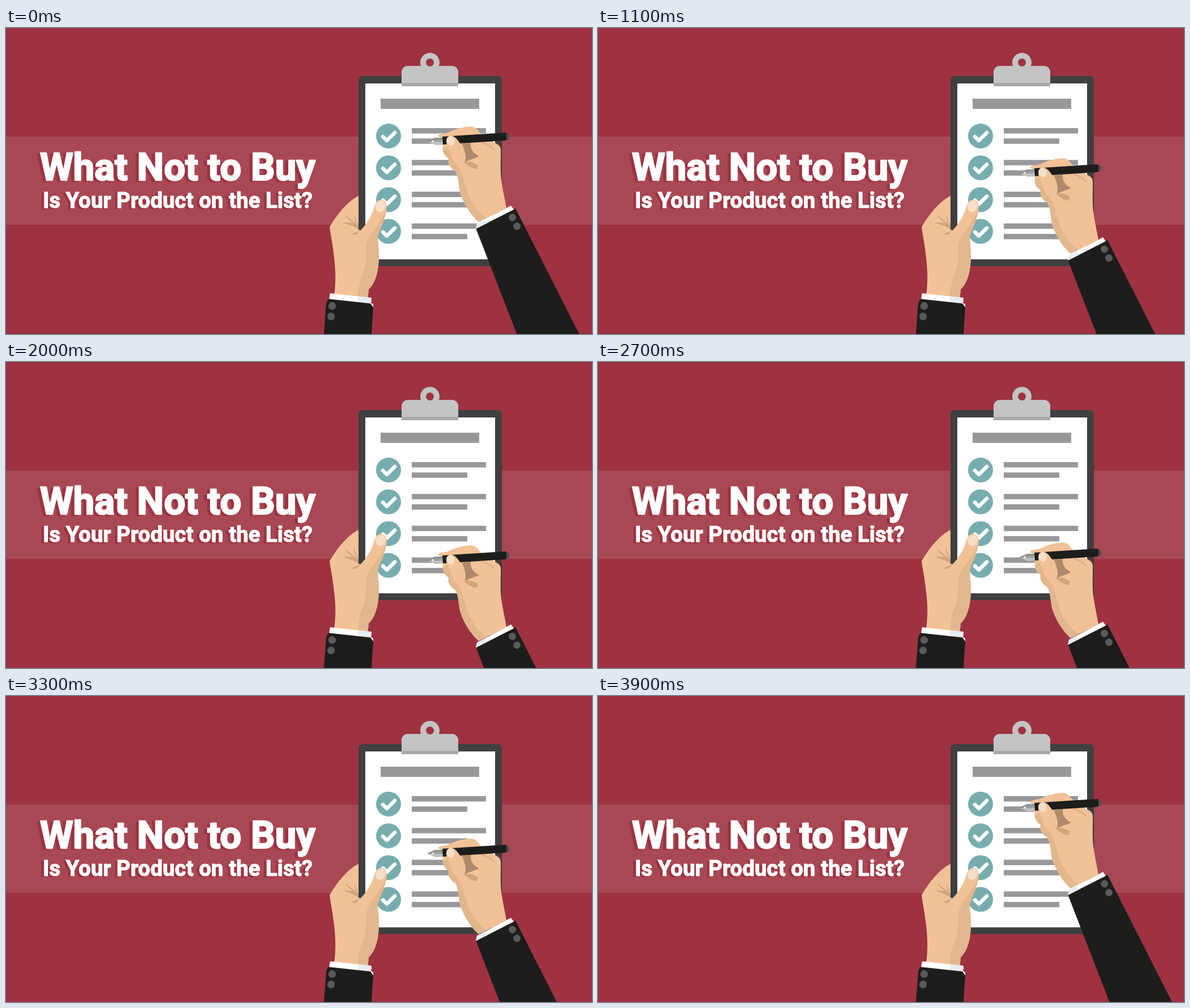
An HTML page with a canvas for the animation above (4 s loop, 1034 px wide and 541 px high).

```html
<!DOCTYPE html>
<html lang="en">
<head>
<meta charset="utf-8">
<title>What Not to Buy</title>
<style>
html, body { margin: 0; width: 100%; height: 100%; overflow: hidden; background: #9e3241; }
canvas { display: block; width: 100%; height: 100%; }
</style>
</head>
<body>
<canvas id="stage" width="1034" height="541"></canvas>
<script>
const W = 1034, H = 541, LOOP = 4000, STEP = 100;
const ctx = document.getElementById('stage').getContext('2d');

const RED = '#9e3241', BAND = '#a94855', BOARD = '#403f3f', BAR = '#98989a';
const TEAL = '#77adae', SKIN = '#f1c297', SHADE = '#e2b78e', CREASE = '#cfa47d';
const DEEP = '#af8a6a', NAIL = '#f5dfc8', BLACK = '#1d1d1b', BUTTON = '#5b5a58';

function shape(color, d) {
  ctx.fillStyle = color;
  ctx.fill(new Path2D(d));
}

function line(color, width, d) {
  ctx.strokeStyle = color;
  ctx.lineWidth = width;
  ctx.lineCap = ctx.lineJoin = 'round';
  ctx.stroke(new Path2D(d));
}

function rect(color, x, y, w, h, r = 0) {
  ctx.fillStyle = color;
  ctx.beginPath();
  ctx.roundRect(x, y, w, h, r);
  ctx.fill();
}

function oval(color, x, y, rx, ry = rx, turn = 0) {
  ctx.fillStyle = color;
  ctx.beginPath();
  ctx.ellipse(x, y, rx, ry, turn, 0, Math.PI * 2);
  ctx.fill();
}

// One line of heavy lettering, sized to fill the width, with a flat drop shadow
function heading(text, x, baseline, width, maxSize, weight, drop) {
  const font = size => `semi-condensed 700 ${size}px Roboto, "Open Sans", sans-serif`;
  ctx.font = font(100);
  const size = Math.min(maxSize, 100 * width / ctx.measureText(text).width);
  ctx.font = font(size);
  ctx.lineJoin = 'round';
  ctx.lineWidth = weight;
  for (const [color, dx, dy] of [[RED, -drop, drop * 0.45], ['#fff', 0, 0]]) {
    ctx.fillStyle = ctx.strokeStyle = color;
    ctx.fillText(text, x + dx, baseline + dy);
    ctx.strokeText(text, x + dx, baseline + dy);
  }
}

function clipboard() {
  rect(BOARD, 622, 85, 253, 336, 7);
  rect('#fff', 634, 98, 229, 311);

  oval('#c4c4c4', 748, 61, 17);
  rect('#c4c4c4', 698, 67, 100, 36, [11, 11, 0, 0]);
  rect('#a8a8a8', 698, 97, 100, 6);
  oval(RED, 748, 61, 7);

  rect(BAR, 661, 125, 174, 18);
  for (let i = 0; i < 4; i++) {
    const y = 191 + i * 56.2;
    oval(TEAL, 675, y, 22);
    line('#fff', 6.5, `M665 ${y + 1}L672 ${y + 8}L686 ${y - 6}`);
    rect(BAR, 716, y - 14, 131, 9.5);
    rect(BAR, 716, y + 4.3, 98, 9.5);
  }
}

function leftHand() {
  shape(SKIN, `M579 472C583 445 581 420 578 398C576 380 573 367 571 352
    C579 338 600 307 622 297L622 356L625 358C636 348 645 332 650 316
    C653 307 658 303 664 304C671 306 673 314 671 325C668 341 661 352 656 368
    C656 383 659 396 658 408C657 428 653 450 640 462L638 480Z`);
  shape(SHADE, `M671 322C668 341 661 352 656 368C656 383 659 396 658 408
    C657 428 653 450 640 462L638 480L621 477C622 458 624 446 630 432
    C638 412 635 398 636 384C638 365 660 348 671 322Z`);
  oval(NAIL, 661, 315, 8.5, 10.5, 0.3);
  shape(CREASE, 'M597 331C606 336 615 344 622 349L622 357C615 350 607 349 594 344C602 344 608 344 612 345C607 340 602 337 597 331Z');
  shape(CREASE, 'M608 363C614 364 620 360 624 358C620 366 615 368 608 363Z');
  line(CREASE, 1.4, 'M614 331C616 338 618 343 621 347');

  shape('#fff', 'M572 469L645 477L644 488L570 480Z');
  shape('#e8edf3', 'M621 474.500L645 477L644 488L621 485.500Z');
  shape('#fff', 'M642 486L648 488L648 495Z');
  shape(BLACK, 'M569 479L643 487L648 494L645 541L561 541L565 486Z');
  oval(BUTTON, 575.5, 491.5, 6.7);
  oval(BUTTON, 573.5, 510, 6.7);
}

function rightHand() {
  shape(BLACK, 'M829 354L899 319L1024 566L911 566Z');
  shape('#fff', 'M831 346L891 314L896 321L829 355Z');
  shape('#e8edf3', 'M831 346L845 338.500L849 345L829 355Z');
  oval(BUTTON, 893.500, 335, 6.5);
  oval(BUTTON, 901.500, 350.500, 6.5);

  // Fingers, palm and wrist
  shape(SKIN, `M762 191C766 185 775 188 784 183C796 177 808 175 819 174
    C829 174 832 180 838 187L862 203C871 207 873 210 873 217
    C873 235 872 252 874 269C877 289 881 306 883 319L834 343
    C818 329 807 308 802 293C798 279 799 263 793 253
    C783 247 779 239 781 231C772 224 769 217 771 207L772 197Z`);
  shape(SHADE, `M771 213C770 221 775 227 781 231C779 239 783 247 793 253
    C799 263 798 279 802 293C807 308 818 329 834 343L848 336
    C831 324 817 303 811 281C807 264 803 249 794 239C785 230 784 218 780 209Z`);
  shape(DEEP, 'M804 205L820 203C819 212 823 221 835 227C828 230 819 232 808 238C811 228 811 216 804 205Z');
  shape(CREASE, 'M808 238C817 234 825 238 832 242L831 249C823 250 815 243 808 238Z');
  line(CREASE, 1.6, 'M840 203C848 205 855 209 861 215');

  // Nib and barrel
  shape('#bfc0c2', 'M743 200.500L757 194L772 194L772 206.500L758 207Z');
  shape('#929395', 'M743 200.500L757 194L772 194L772 198L757 199Z');
  line('#77787a', 1, 'M744 200.500L771 200');
  oval('#f4f4f4', 753, 200.3, 1.8);
  shape('#4e4d4d', 'M880 186L885 186Q888 188 888 192Q888 196 885 198L880 198Z');
  shape(BLACK, 'M770 192L880 185Q883 185 883 188L883 196Q883 199 880 199L771 206Z');

  // Thumb over the barrel
  shape(SKIN, `M777 202C776 194 781 190 787 191C795 192 800 203 806 211
    C811 220 813 231 808 240L794 240C786 231 783 218 778 208Z`);
  oval(NAIL, 784.5, 199.5, 6.8, 8.5, -0.25);
}

// [time, vertical offset of the writing hand]
const keys = [
  [0, 0], [400, 0], [600, 38], [1000, 38], [1300, 92], [1700, 92], [2000, 150],
  [2400, 150], [2600, 148], [2700, 145], [2800, 137], [3000, 114],
  [3300, 78], [3600, 34], [3800, 8], [3900, -3], [4000, 0]
];

function handOffset(time) {
  const t = Math.floor(time / STEP) * STEP;
  const i = keys.findIndex(k => k[0] > t);
  const [t0, y0] = keys[i - 1], [t1, y1] = keys[i];
  return Math.round(y0 + (y1 - y0) * (t - t0) / (t1 - t0));
}

function draw(time) {
  rect(RED, 0, 0, W, H);
  rect(BAND, 0, 192, W, 156);
  heading('What Not to Buy', 60, 269, 486, 76, 2.4, 5.5);
  heading('Is Your Product on the List?', 65, 317.5, 476, 44, 1.2, 4.5);
  clipboard();
  leftHand();
  ctx.save();
  ctx.translate(0, handOffset(time));
  rightHand();
  ctx.restore();
}

const start = performance.now();
function tick() {
  draw((performance.now() - start) % LOOP);
  requestAnimationFrame(tick);
}
tick();
</script>
</body>
</html>
```
